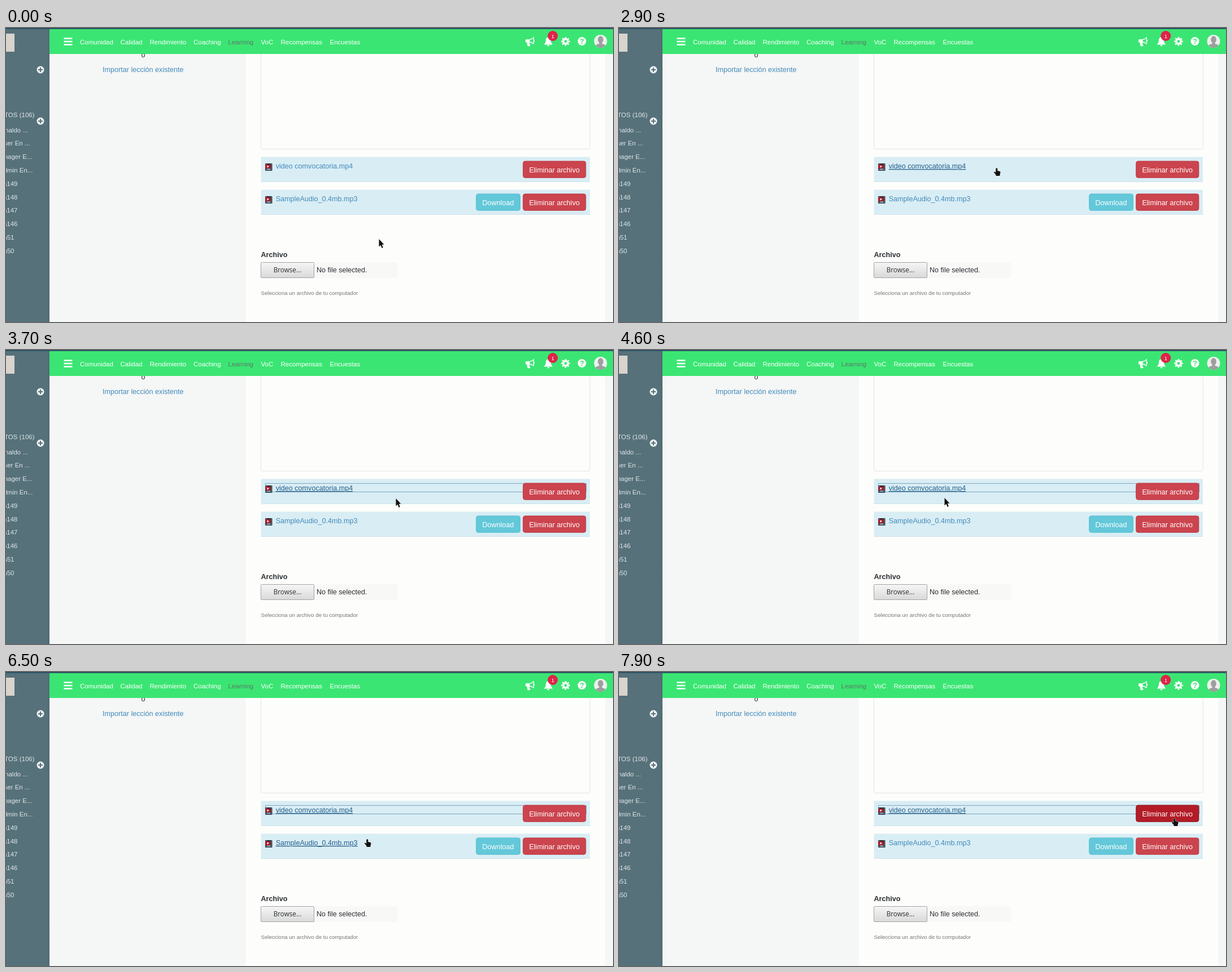
Write an HTML page that moves like this. It is 1075 px wide and 521 px high and loops after 8000 ms.

```html
<!DOCTYPE html>
<html lang="es">
<head>
<meta charset="utf-8">
<title>Archivos de la lección</title>
<style>
html, body { margin: 0; width: 100%; height: 100%; overflow: hidden; background: #fdfefc; }
svg { display: block; width: 1075px; height: 521px; }
text { font: 12.6px "Liberation Sans", Arial, sans-serif; fill: #2b2f31; white-space: pre; }
.nav text { font-size: 11.5px; fill: #fff; }
.nav .active { fill: #5c7867; }
.side text { font-size: 11.5px; fill: #dfe6e8; text-anchor: end; }
.link { fill: #428bbc; }
.link.on { fill: #245f8c; text-decoration: underline; }
.btn text { fill: #fff; text-anchor: middle; }
.red { fill: #cb444e; stroke: #bd3742; }
.hot .red { fill: #b31c27; stroke: #92151f; }
.blue { fill: #63c8d9; stroke: #54bfd1; }
.white { fill: #fff; }
.pointer { fill: #111; stroke: #fff; stroke-width: .8; paint-order: stroke; }
</style>
</head>
<body>
<svg viewBox="0 0 1075 521">
  <defs>
    <linearGradient id="metal" x2="0" y2="1">
      <stop stop-color="#f6f6f6"/><stop offset="1" stop-color="#d9d9d9"/>
    </linearGradient>
    <linearGradient id="shade">
      <stop stop-color="#3d565f" stop-opacity="0"/><stop offset="1" stop-color="#3d565f" stop-opacity=".2"/>
    </linearGradient>
    <clipPath id="face"><circle cx="1053" cy="23.5" r="11.5"/></clipPath>
    <g id="plus">
      <circle r="6.5" fill="#eef2f3"/>
      <path d="M-4 0H4M0-4V4" stroke="#56717a" stroke-width="2"/>
    </g>
    <g id="film">
      <rect width="12.5" height="13" rx="1" fill="#2a2f3a"/>
      <path d="M1.5 1V13M11 1V13" stroke="#b9c8d2" stroke-dasharray="1.5 1.5"/>
      <rect x="3" y="9" width="6.5" height="3" fill="#7d97a8"/>
      <rect y="2" width="9.5" height="7" rx="1" fill="#a81d28"/>
      <path d="M3.5 3.5 7 5.5 3.5 7.5z" fill="#fff"/>
    </g>
  </defs>

  <!-- page -->
  <rect width="1075" height="521" fill="#f5f6f6"/>
  <rect x="425" width="636" height="521" fill="#fdfefc"/>
  <text x="243" y="51.5" text-anchor="middle">ó</text>
  <text class="link" x="171" y="78">Importar lección existente</text>
  <rect x="451.5" y="20" width="582.5" height="194.5" rx="3" fill="#fdfefc" stroke="#e3e4e3"/>

  <!-- files -->
  <g fill="#d9edf4">
    <rect x="451.5" y="228.5" width="582.5" height="44.5"/>
    <rect x="451.5" y="286.5" width="582.5" height="44.5"/>
    <path d="M451.5 272.5H1034M451.5 330.5H1034" stroke="#cde2ea"/>
  </g>
  <use href="#film" x="459" y="240"/>
  <use href="#film" x="459" y="298"/>
  <text class="link" id="video" x="477.7" y="249">video comvocatoria.mp4</text>
  <text class="link" id="audio" x="477.7" y="307">SampleAudio_0.4mb.mp3</text>
  <rect id="focus" x="459.5" y="236.5" width="568" height="15" fill="none" stroke="#245f8c" stroke-dasharray="1 1"/>
  <g class="btn" id="remove">
    <rect class="red" x="915.8" y="236" width="111" height="29.3" rx="3.5"/>
    <text x="971.2" y="255.5">Eliminar archivo</text>
  </g>
  <g class="btn">
    <rect class="red" x="915.8" y="294" width="111" height="29.3" rx="3.5"/>
    <text x="971.2" y="313.5">Eliminar archivo</text>
    <rect class="blue" x="832.8" y="294" width="77.7" height="29.3" rx="3.5"/>
    <text x="871.5" y="313.5">Download</text>
  </g>

  <!-- upload -->
  <text x="451.5" y="406" style="font-weight:bold">Archivo</text>
  <rect x="451" y="415" width="243" height="28" fill="#f8f8f7"/>
  <rect x="451.5" y="415.5" width="94" height="27" rx="1" fill="url(#metal)" stroke="#a3a3a3"/>
  <text x="498.5" y="433" text-anchor="middle" style="font:11.7px 'Open Sans',sans-serif">Browse...</text>
  <text x="550" y="433">No file selected.</text>
  <text x="451.5" y="473" style="font-size:9.65px;fill:#737576">Selecciona un archivo de tu computador</text>

  <!-- sidebar -->
  <rect width="77" height="521" fill="#56717a"/>
  <rect x="71" width="6" height="521" fill="url(#shade)"/>
  <rect y="10" width="15" height="32" fill="#d8d3cd"/>
  <use href="#plus" x="61" y="74"/>
  <use href="#plus" x="61" y="165"/>
  <g class="side" id="side"></g>

  <!-- top bar -->
  <rect width="1075" height="2" fill="#2c5364"/>
  <rect x="77" y="2" width="998" height="44" fill="#3be573"/>
  <path d="M102.5 18.5H117.5M102.5 24H117.5M102.5 29.5H117.5" stroke="#fff" stroke-width="2.4"/>
  <g class="nav" id="nav"></g>
  <g class="white">
    <path fill-rule="evenodd" d="M920 21.5Q920 20 921.5 20H926Q931 19.5 935 15.500V20.5Q937.5 22 935 25V29Q931 26 927.5 25.8Q926 28 929 31Q926.5 33.5 923.5 31.500L922.5 25.5Q920 26 920 24zM927.5 21.300V24.3Q931 24.8 933.7 26.700V18.2Q931 20.7 927.5 21.300z"/>
    <path d="M952.5 29.5Q956 26.5 956 21.5Q956 17 960.5 16.3Q965 17 965 21.5Q965 26.5 968.5 29.500zM958.5 30.300H962.5Q962 32.5 960.5 32.500T958.5 30.300z"/>
    <circle cx="991" cy="23.8" r="4.2" fill="none" stroke="#fff" stroke-width="3.5"/>
    <circle cx="991" cy="23.8" r="6.6" fill="none" stroke="#fff" stroke-width="2.6" stroke-dasharray="2.6 2.584" stroke-dashoffset="1.3"/>
    <circle cx="1020" cy="23.5" r="7.5"/>
  </g>
  <text x="1020" y="28" text-anchor="middle" style="font-weight:bold;fill:#3be573">?</text>
  <circle cx="968.3" cy="14" r="9" fill="#df2448"/>
  <text x="968.3" y="17.5" text-anchor="middle" style="font-size:9.6px;fill:#fff">1</text>
  <g clip-path="url(#face)" fill="#9c9f9e">
    <rect x="1041" y="12" width="24" height="24" fill="#eef0ee"/>
    <ellipse cx="1053" cy="20.5" rx="4.8" ry="6.3"/>
    <path d="M1050.5 25H1055.500V28Q1063 29 1064 36H1042Q1043 29 1050.5 28z"/>
  </g>

  <!-- pointers -->
  <path class="pointer" id="arrow" d="M-.5 0V13.500L2.5 10.7 4.7 16 6.8 15 4.8 9.800H8.500z"/>
  <path class="pointer" id="hand" d="M-1.7 1Q0-.6 1.3 1V5L5.5 6Q6.7 6.3 6.5 8L5.5 12V14H-1.500V12L-5 8Q-5 6.3-3.5 6.800L-1.700 8z"/>
</svg>
<script>
const $ = id => document.getElementById(id);
const label = (text, x, y, cls = "") => `<text class="${cls}" x="${x}" y="${y}">${text}</text>`;

$("nav").innerHTML = [
  ["Comunidad", 131], ["Calidad", 202.5], ["Rendimiento", 254.5], ["Coaching", 332],
  ["Learning", 393.5, "active"], ["VoC", 451.5], ["Recompensas", 486.5], ["Encuestas", 573.5]
].map(([text, x, cls]) => label(text, x, 29, cls)).join("");

$("side").innerHTML = label("CTOS (106)", 50.5, 157.5) + [
  ["naldo ...", 39], ["ser En ...", 42.5], ["nager E...", 46.5], ["dmin En...", 47.5],
  ["n149", 20.5], ["n148", 20.5], ["n147", 20.5], ["n146", 20.5], ["n51", 14.5], ["n50", 14.5]
].map(([text, x], i) => label(text, x, 184.5 + i * 23.8)).join("");

// What the pointer is over
const PAGE = 0, VIDEO = 1, AUDIO = 2, REMOVE = 3, EDGE = 4;

// Pointer steps: time, x, y, what it is over
const steps = [
  [0, 661, 374, PAGE], [600, 659, 372, PAGE], [700, 650, 358, PAGE], [800, 628, 322, PAGE],
  [900, 590, 275, PAGE], [1000, 562, 217, PAGE], [1100, 558, 233, EDGE], [1200, 572, 239, VIDEO],
  [1300, 592, 244, VIDEO], [1400, 604, 246, VIDEO],
  [2900, 669, 248, VIDEO], [3000, 675, 249, VIDEO], [3100, 680, 251, VIDEO], [3200, 684, 254, PAGE],
  [3300, 687, 256, PAGE], [3400, 689, 258, PAGE], [3500, 690, 260, PAGE], [3600, 691, 262, PAGE],
  [3700, 691, 263, PAGE], [3900, 662, 257, PAGE], [4000, 622, 250, VIDEO], [4100, 603, 247, VIDEO],
  [4300, 586, 252, VIDEO], [4400, 578, 255, VIDEO],
  [4600, 577, 262, PAGE], [4700, 578, 275, PAGE], [4800, 579, 286, PAGE], [4900, 579, 291, PAGE],
  [5100, 582, 278, PAGE], [5300, 577, 263, PAGE], [5400, 571, 253, VIDEO], [5500, 568.5, 251, VIDEO],
  [6500, 640, 296, AUDIO], [6700, 722, 316, PAGE], [6800, 771, 328, PAGE],
  [7200, 926, 250, PAGE], [7300, 933, 251, REMOVE], [7600, 958, 253, REMOVE],
  [7700, 992, 256, REMOVE], [7800, 1015, 257, REMOVE], [7900, 984, 259, REMOVE]
];

function draw(now) {
  const t = now % 8000;
  const [, x, y, over] = steps.findLast(step => step[0] <= t);
  const focused = t >= 2900;
  const show = (id, on) => $(id).style.display = on ? "" : "none";
  show("arrow", over === PAGE);
  show("hand", over !== PAGE);
  show("focus", focused && over !== VIDEO);
  $(over === PAGE ? "arrow" : "hand").setAttribute("transform", `translate(${x} ${y})`);
  $("video").classList.toggle("on", focused || over === VIDEO);
  $("audio").classList.toggle("on", over === AUDIO);
  $("remove").classList.toggle("hot", over === REMOVE);
  requestAnimationFrame(draw);
}
draw(0);
</script>
</body>
</html>
```
